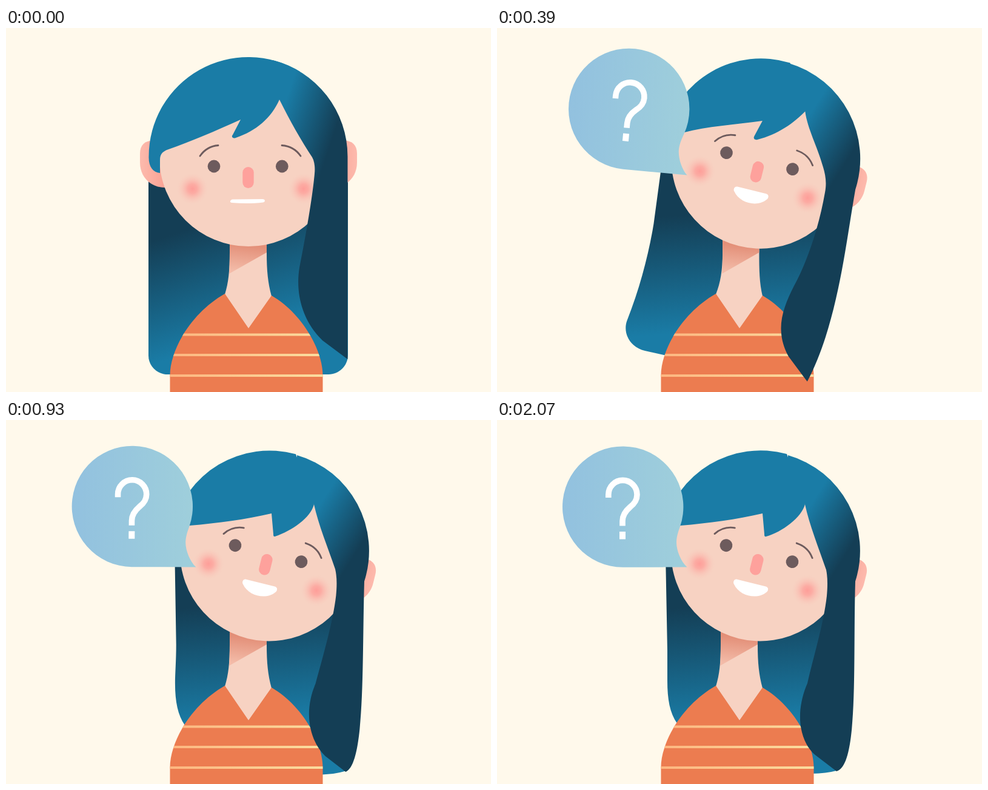
These frames come from a looping animation (800 by 600 pixels, 2700 ms). An HTML page:

```html
<!DOCTYPE html>
<html lang="en">
<head>
<meta charset="utf-8">
<title>Question</title>
<style>
  html, body { margin: 0; width: 100%; height: 100%; overflow: hidden; background: #fff9eb; }
  svg { display: block; width: 800px; height: 600px; }
</style>
</head>
<body>
<svg viewBox="0 0 800 600">
  <defs>
    <linearGradient id="backFill" gradientUnits="userSpaceOnUse" x1="245" y1="350" x2="305" y2="535">
      <stop offset="0" stop-color="#143e55"/><stop offset="1" stop-color="#1a7ca6"/>
    </linearGradient>
    <linearGradient id="lockFill" gradientUnits="userSpaceOnUse" x1="472" y1="88" x2="560" y2="117">
      <stop offset="0" stop-color="#1a7ca6"/><stop offset="1" stop-color="#143e55"/>
    </linearGradient>
    <linearGradient id="shadeFill" gradientUnits="userSpaceOnUse" x1="400" y1="358" x2="395" y2="402">
      <stop offset="0" stop-color="#e38f78"/><stop offset="1" stop-color="#f3bba8"/>
    </linearGradient>
    <linearGradient id="stripeFill" gradientUnits="userSpaceOnUse" x1="271" y1="0" x2="523" y2="0">
      <stop offset="0" stop-color="#fdb680"/><stop offset="1" stop-color="#fbdd9f"/>
    </linearGradient>
    <linearGradient id="earFill" gradientUnits="userSpaceOnUse" x1="221" y1="0" x2="262" y2="0">
      <stop offset="0" stop-color="#fdbaad"/><stop offset="1" stop-color="#f9a294"/>
    </linearGradient>
    <linearGradient id="bubbleFill" gradientUnits="userSpaceOnUse" x1="-205" y1="0" x2="0" y2="0">
      <stop offset="0" stop-color="#92c1df"/><stop offset="1" stop-color="#9fcfdb"/>
    </linearGradient>
    <radialGradient id="blush">
      <stop offset="0" stop-color="#fe9e99"/>
      <stop offset=".3" stop-color="#fda59e" stop-opacity=".85"/>
      <stop offset="1" stop-color="#f9cbbd" stop-opacity="0"/>
    </radialGradient>
    <clipPath id="torso"><use href="#shirt"/></clipPath>
  </defs>

  <path id="back" fill="url(#backFill)"/>
  <path id="neck" fill="#f7d2c2"/>
  <path id="shade" fill="url(#shadeFill)"/>
  <path id="shirt" fill="#ec7c50" d="M270.5 600V572C271 530 305 470 361 438L400 495L438 441C488 470 522 530 522.5 572V600Z"/>
  <path clip-path="url(#torso)" stroke="url(#stripeFill)" stroke-width="4" fill="none" d="M270 505.5H524V505.4M270 539H524V539.1M270 573H524V573.1"/>

  <g class="head">
    <path id="ear" fill="url(#earFill)" d="M262 185.500H243C229 185.500 221 193 221 207V222C221 245 238 263 262 263Z"/>
    <use href="#ear" transform="translate(800) scale(-1 1)"/>
    <circle cx="400" cy="213" r="147" fill="#f7d2c2"/>
    <g id="soft">
      <circle cx="307.500" cy="265" r="26" fill="url(#blush)"/>
      <circle cx="491" cy="265" r="26" fill="url(#blush)"/>
      <path fill="none" stroke="#6d5b5d" stroke-width="2.800" stroke-linecap="round" d="M320 211Q331 195 350 193.500M455 193.500Q475 195 486 211"/>
    </g>
    <g id="features">
      <ellipse class="eye" cx="343" cy="228" rx="10.400" fill="#6d5b5d"/>
      <ellipse class="eye" cx="455.300" cy="228" rx="10.400" fill="#6d5b5d"/>
      <rect x="390.300" y="229" width="18.400" height="35" rx="9.200" fill="#fea19c"/>
      <path id="mouth" fill="#fff"/>
    </g>
  </g>

  <path id="fringe" fill="#1a7ca6"/>
  <path id="lock" fill="url(#lockFill)"/>

  <g id="bubble">
    <path fill="url(#bubbleFill)" d="M0 0C-10 -9 -18 -28 -17.500 -42C-17 -52 -14 -60 -11.500 -67A99.700 99.700 0 1 0 -106 .3Z"/>
    <path fill="none" stroke="#fff" stroke-width="9.600" d="M-129.700 -114.500V-119.500A23.600 23.600 0 0 1 -82.500 -119.500C-82.500 -110 -87 -104.500 -94 -99C-101 -93 -106.500 -85 -106.500 -76V-68"/>
    <rect x="-111.500" y="-58.500" width="10" height="12.500" fill="#fff"/>
  </g>
</svg>

<script>
const LOOP = 2700, STEP = 30;
const NUM = /-?\d*\.?\d+/g;
const nums = s => s.match(NUM).map(Number);
const $ = id => document.getElementById(id);
const all = s => [...document.querySelectorAll(s)];

// Blend two pose strings; k above 1 overshoots the second.
function mix(a, b, k) {
  const va = nums(a), vb = nums(b);
  let i = 0;
  return a.replace(NUM, () => { const v = va[i] + (vb[i] - va[i]) * k; i++; return v.toFixed(2); });
}

// Smooth interpolation through timed pose strings, at rest on every extreme.
function track(keys) {
  const T = keys.map(k => k[0]), V = keys.map(k => nums(k[1])), last = T.length - 1;
  const slope = (i, n) => (V[i + 1][n] - V[i][n]) / (T[i + 1] - T[i]);
  const tangent = (i, n) => {
    if (i === 0 || i === last) return 0;
    const a = slope(i - 1, n), b = slope(i, n);
    return a * b <= 0 ? 0 : 2 * a * b / (a + b);
  };
  return t => {
    if (t <= T[0]) return V[0];
    if (t >= T[last]) return V[last];
    const i = T.findIndex(x => x > t) - 1, span = T[i + 1] - T[i], u = (t - T[i]) / span;
    return V[i].map((a, n) => {
      const b = V[i + 1][n], s = u * u * (3 - 2 * u);
      return a + (b - a) * s + span * u * (1 - u) * ((1 - u) * tangent(i, n) - u * tangent(i + 1, n));
    });
  };
}

function shapeTrack(keys) {
  const at = track(keys), form = keys[0][1];
  return t => {
    const v = at(t);
    let i = 0;
    return form.replace(NUM, () => +v[i++].toFixed(2));
  };
}

// Hair: rest, swing, lean, rebound, settle.
function hair([rest, swing, lean, rebound, settle]) {
  return shapeTrack([[0, rest], [300, swing], [480, lean],
    [600, mix(lean, rebound, 1.18)], [720, rebound], [1050, settle]]);
}

const back = hair([
  'M235,215 L235,400 C235,450 235,500 235,540 C235,557 249,571 267,571 L532,571 C549,571 564,557 564,539 L564,212 Z',
  'M272,185 L254,290 C246,350 228,410 194,476 C186,493 196,516 219,521 L470,590 C505,580 525,540 535,500 L587,260 Z',
  'M280,180 L264,355 C258,390 252,445 247,490 C243,512 254,536 277,543 L470,575 C490,570 505,560 515,540 L590,265 Z',
  'M279,220 L280,345 C280,390 274,410 274,445 C274,475 280,495 290,510 L500,591 C525,592 545,588 562,581 L590,262 Z',
  'M278,220 L281,380 C281,400 281,420 281,430 C281,460 285,483 297,500 L500,582 C525,584 545,582 560,578 L590,262 Z'
]);

const fringe = hair([
  'M254,239 C242,238 235,228 235.5,212 A164,164 0 0 1 485,72 L451,118 C438,148 412,170 379,181 C374,183 371,179 374,176 L387,151 C345,170 305,187 268,200 C256,204 254,210 254,218 Z',
  'M284,206 C272,202 268,195 271,176 A164,164 0 0 1 482,54 L502,132 C492,158 465,176 432,184 C427,185 425,182 427,178 L433,150 C385,157 340,157 302,172 C290,176 287,183 285,190 Z',
  'M288,208 C278,206 274,195 278,177 A164,164 0 0 1 485,61 L511,141 C488,155 460,176 427,184 C421,185 420,181 422,178 L440,156 C395,163 350,168 311,173 C300,174 296,180 294,190 Z',
  'M287,206 C277,204 272,195 275,178 A164,164 0 0 1 478,57 L508,139 C503,164 475,178 446,191 C441,193 441,191 441,188 L438,154 C395,164 350,170 303,174 C297,176 296,180 294,188 Z',
  'M287,206 C277,204 272,195 275,177 A164,164 0 0 1 478,56 L508,139 C503,160 470,185 444,192 C441,193 441,190 441,188 L438,154 C395,164 350,170 303,174 C297,176 296,180 294,188 Z'
]);

const lock = hair([
  'M451,118 C468,152 487,186 505,213 C509,220 510,230 509,240 C506,275 495,340 484,395 C476,445 494,488 522,515 L563.5,546 C563.5,430 563.5,320 563.5,212 A164,164 0 0 0 440,53 L435,100 Z',
  'M502,132 C505,160 531,180 540,222 C543,236 546,252 545,270 C540,340 526,395 505,428 C485,462 460,492 487,540 L516,580 C588,480 583,350 589,260 A164,164 0 0 0 484,57 L475,95 Z',
  'M511,141 C516,172 525,208 536,238 C541,250 542,260 537,272 C522,316 498,374 475,422 C456,464 457,510 478,543 L510,584 C536,495 566,372 592,269 A164,164 0 0 0 480,59 L482,105 Z',
  'M508,139 C515,172 531,205 543,243 C548,256 548,272 546,288 C542,325 526,392 507,438 C494,470 500,520 530,558 L562,582 C584,560 588,390 591,266 A164,164 0 0 0 480,58 L480,100 Z',
  'M508,139 C515,172 531,212 543,247 C546,262 545,278 544,290 C539,335 522,390 512,434 C490,485 500,532 526,553 L560,579 C597,570 587,400 591,266 A164,164 0 0 0 480,58 L480,100 Z'
]);

const mouth = shapeTrack([
  [0, 'M374,282.5 L423,282 C428,282 428,287 424,287.5 C407,289.5 390,289.5 372,288 C368,287 370,283 374,282.5 Z'],
  [300, 'M374,278 L423,278 C428,278 429,284 426,287 C414,303.5 384,303.5 371,287 C368,284 369,278 374,278 Z']
]);

// angle, centre x, centre y, feature lift, neck shift
const head = track([
  [0, '0 400 213 0 0'], [300, '12.6 431 214 12.5 4.5'],
  [480, '14.5 436 219 12 1'], [570, '13.9 434 217.5 12 0']
]);

// tip x, tip y, scale, angle
const bubble = track([
  [180, '372 312 0 -24'], [300, '339 276 .59 -11.4'], [390, '313.5 242.5 1 5.5'],
  [510, '313 242 1 -4'], [640, '313.5 242.5 1 2.2'], [720, '313.5 242.5 1 -.4'],
  [780, '313.5 242.5 1 -1'], [900, '313.5 242.5 1 .4'], [1050, '313.5 242.5 1 0']
]);

const BLINKS = [1110, 1980 - STEP], LID = [1, .67, .33, .67];
function lid(t) {
  const start = BLINKS.find(b => t >= b && t < b + 4 * STEP);
  return start === undefined ? 1 : LID[(t - start) / STEP];
}

function draw(t) {
  const [angle, cx, cy, lift, dx] = head(t);
  const pose = `translate(${cx} ${cy}) rotate(${angle}) translate(-400 -213)`;
  const set = (el, name, value) => el.setAttribute(name, value);

  all('.head').forEach(g => set(g, 'transform', pose));
  ['backFill', 'lockFill'].forEach(id => set($(id), 'gradientTransform', pose));
  set($('features'), 'transform', `translate(0 ${-lift})`);
  set($('soft'), 'transform', `translate(0 ${-lift * .75})`);
  all('.eye').forEach(e => set(e, 'ry', 10.4 * lid(t)));

  const l = 369 + dx, r = 430 + dx * .8;
  set($('neck'), 'd', `M${l} 335V370C${l} 400 ${367 + dx * .5} 420 361 439L400 496L438 442C${432 + dx * .3} 420 ${r} 400 ${r} 370V335Z`);
  set($('shade'), 'd', `M${l} 335V370Q${l} 390 ${l - 1} 405L${r} 370V335Z`);

  const parts = { back, fringe, lock, mouth };
  for (const id in parts) set($(id), 'd', parts[id](t));

  const [x, y, s, a] = bubble(t);
  set($('bubble'), 'transform', `translate(${x} ${y}) rotate(${a}) scale(${s})`);
  set($('bubble'), 'visibility', s > 0 ? 'visible' : 'hidden');
}

const began = performance.now();
function tick() {
  const t = (performance.now() - began) % LOOP;
  draw(Math.floor(t / STEP) * STEP);
  requestAnimationFrame(tick);
}
tick();
</script>
</body>
</html>
```
